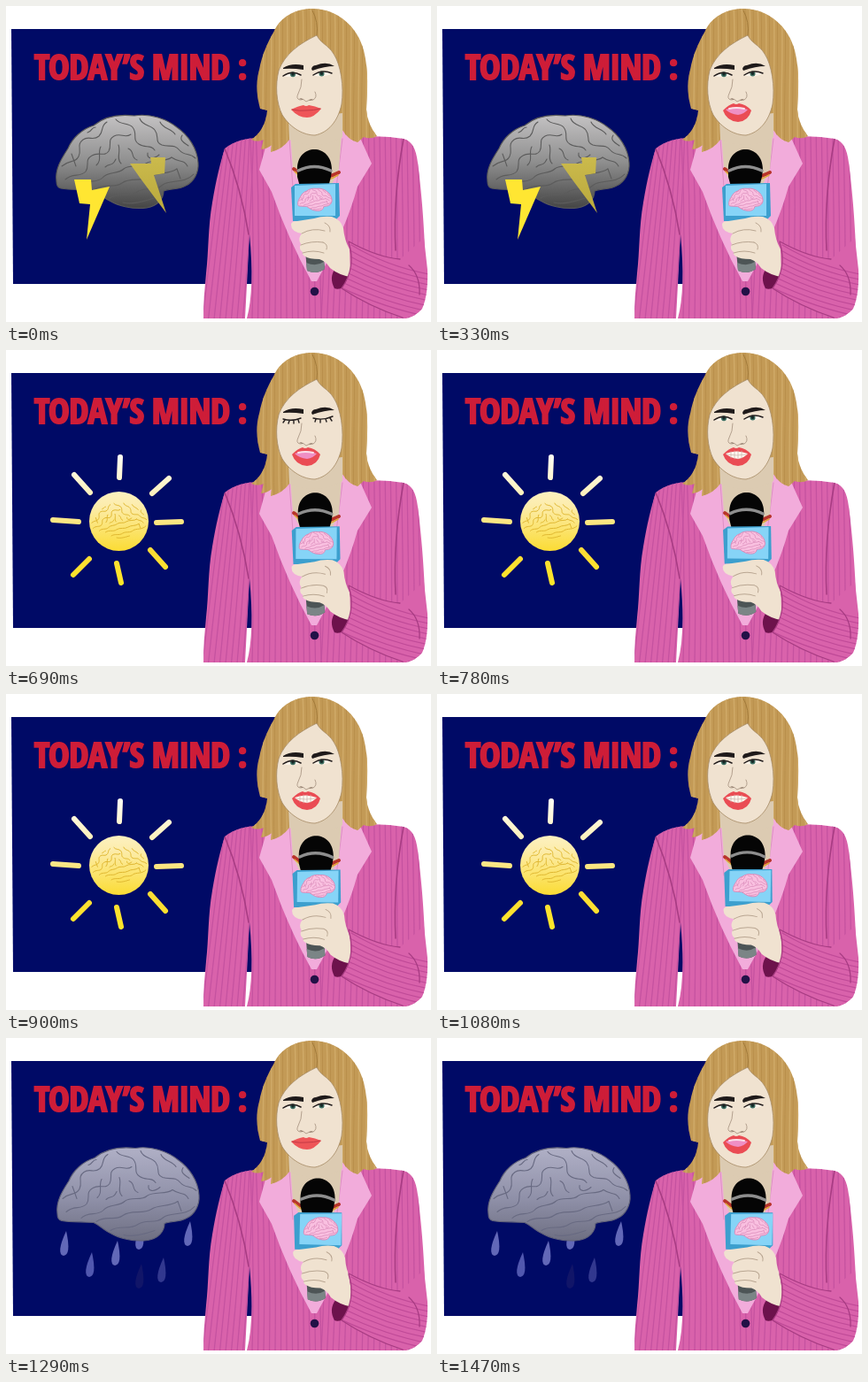
Animation of 480x357 px, one loop 1.8 s. Source, as an HTML page:

```html
<!DOCTYPE html>
<html lang="en">
<head>
<meta charset="utf-8">
<title>Today's Mind</title>
<style>
html, body { margin: 0; width: 100%; height: 100%; overflow: hidden; background: #fff; }
svg { display: block; width: 100vw; height: 100vh; }
.line { fill: none; stroke-linecap: round; stroke-linejoin: round; }
#title { font-weight: 700; font-stretch: condensed; letter-spacing: -.015em; }
</style>
</head>
<body>
<svg viewBox="0 0 480 357" preserveAspectRatio="none">
  <defs>
    <linearGradient id="storm" x1="0" y1="0" x2="0" y2="1">
      <stop offset="0" stop-color="#c4c2c3"/><stop offset=".5" stop-color="#8f8f8f"/><stop offset="1" stop-color="#454545"/>
    </linearGradient>
    <linearGradient id="rain" x1="0" y1="0" x2="0" y2="1">
      <stop offset="0" stop-color="#b0b0c6"/><stop offset=".55" stop-color="#8f90a8"/><stop offset="1" stop-color="#6e6f82"/>
    </linearGradient>
    <linearGradient id="sun" gradientUnits="userSpaceOnUse" x1="0" y1="120" x2="0" y2="262">
      <stop offset="0" stop-color="#fffdf2"/><stop offset=".4" stop-color="#fcecab"/><stop offset=".75" stop-color="#fbdc35"/><stop offset="1" stop-color="#ffe629"/>
    </linearGradient>
    <linearGradient id="bolt" x1="0" y1="0" x2="0" y2="1">
      <stop offset="0" stop-color="#cbba4c"/><stop offset="1" stop-color="#b9a83c"/>
    </linearGradient>
    <path id="brainShape" d="M57 198 C55 184 63 172 70 161 C75 149 86 139 99 135 C111 125 128 122 145 124 C163 121 182 128 193 137 C206 146 216 161 217 177 C218 188 212 199 203 203 C195 208 184 206 178 209 C178 218 171 226 159 228 C143 230 127 226 117 220 C110 217 105 211 98 208 C86 207 72 208 62 206 C58 205 57 202 57 198Z"/>
    <g id="folds" class="line">
      <path d="M63 181 C72 173 78 178 82 170 C86 162 79 157 87 151 C94 146 98 153 105 147 C111 141 106 136 114 131"/>
      <path d="M67 196 C75 188 84 194 90 187 C95 180 88 174 97 169 C105 164 111 171 116 164 C120 157 114 151 122 147 C130 143 134 150 141 145"/>
      <path d="M84 203 C91 195 103 201 109 194 C114 187 127 190 133 184 C140 178 152 184 158 178 C166 172 180 177 187 171"/>
      <path d="M101 207 C112 199 122 207 131 200 C140 193 154 199 163 193 C171 187 183 191 193 184"/>
      <path d="M117 217 C127 210 139 217 148 210 C157 204 169 210 177 202 C185 196 202 201 212 190"/>
      <path d="M124 128 C129 135 138 131 143 137 C149 144 142 151 150 156 C157 161 164 156 168 163"/>
      <path d="M151 127 C154 136 164 134 168 140 C174 148 167 153 176 157 C184 160 190 155 196 163 C202 170 207 165 214 172"/>
      <path d="M174 131 C177 139 187 138 191 145 M199 146 C195 152 202 155 206 158 M92 143 C98 141 96 137 101 137"/>
      <path d="M107 159 C103 166 109 174 102 180 M127 157 C130 165 124 172 130 178 M138 161 C146 164 140 171 148 174 M74 167 L79 181"/>
      <path d="M112 182 C117 177 120 182 124 173 M160 166 C159 173 166 174 173 168 M187 171 C195 177 201 173 205 181 M132 222 C143 225 157 220 167 217 M193 184 L197 195"/>
    </g>
    <pattern id="strands" width="9" height="170" patternUnits="userSpaceOnUse">
      <path class="line" d="M2 0 C5 45 0 110 3 170" stroke="#d0aa68" stroke-width="1.4"/>
      <path class="line" d="M6 0 C8 60 4 115 6 170" stroke="#b68c48" stroke-width=".8"/>
    </pattern>
    <path id="jacket" d="M286 149 C270 149 257 153 247 161 C242 177 237 198 233 222 C228 250 229 277 226 302 Q223 328 223 353 H270 L275 258 Q281 320 272 353 H452 Q467 350 472 335 Q478 310 473 285 C473 253 469 207 465 177 C463 161 459 153 449 150 Q425 146 401 148Z"/>
    <clipPath id="inJacket"><use href="#jacket"/></clipPath>
    <path id="sleeve" d="M387 266 Q420 284 445 286 L472 262 Q474 280 476 298 Q477 326 470 342 Q463 351 448 352 Q411 340 379 319 Q391 303 390 287Z"/>
    <clipPath id="inSleeve"><use href="#sleeve"/></clipPath>
    <path id="hair" d="M346 3 C326 3 310 13 303 28 C296 40 289 55 286 72 C281 90 284 104 287 116 L295 118 Q293 140 277 151 Q284 154 291 151 L288 162 Q296 161 300 157 L299 165 Q312 162 320 151 L380 140 Q386 151 397 154 L404 148 Q412 151 419 147 Q408 133 407 117 C408 96 410 74 404 50 C397 23 374 3 346 3Z"/>
    <path id="face" d="M351 33 C332 42 315 54 308 73 C304 89 305 109 312 123 C322 139 337 146 349 146 C364 143 375 130 379 111 C382 91 378 66 370 54 C364 44 355 42 351 33Z"/>
  </defs>

  <rect width="480" height="357" fill="#fff"/>
  <path d="M6 26 H307 V314 H8Z" fill="#000a66"/>
  <text id="title" x="32" fill="#ce1d38" stroke="#ce1d38" stroke-width="2">TODAY’S MIND :</text>

  <g id="stormScene">
    <use href="#brainShape" fill="url(#storm)" stroke="#5a5a5a" stroke-width="1.1"/>
    <use href="#folds" stroke="#5c5c5c" stroke-width="1.1"/>
    <path d="M77 196 L96 196 L97 208 L117 204 L91 264 L95 224 L83 223Z" fill="#ffe632"/>
    <path d="M140 178 L164 178 L163 171 L180 171 L179 189 L167 191 L181 234 L152 195Z" fill="url(#bolt)"/>
  </g>
  <g id="sunScene">
    <circle cx="127.5" cy="193.5" r="33.5" fill="url(#sun)"/>
    <g transform="translate(71 121) scale(.41)"><use href="#folds" stroke="#dfb62f" stroke-width="2.4"/></g>
    <path class="line" stroke="url(#sun)" stroke-width="6" d="M129 121 L128 144 M184 145 L165 162 M170 195 L198 194 M163 226 L180 245 M125 241 L130 263 M94 236 L76 254 M53 192 L82 194 M77 141 L95 161"/>
  </g>
  <g id="rainScene">
    <g id="drops"></g>
    <g transform="translate(1 .5)">
      <use href="#brainShape" fill="url(#rain)" stroke="#62637a" stroke-width="1.1"/>
      <use href="#folds" stroke="#686a82" stroke-width="1.1"/>
    </g>
  </g>

  <use href="#jacket" fill="#d962ab"/>
  <g clip-path="url(#inJacket)">
    <g id="stripes" class="line" stroke="#c552a0" stroke-width="1.3"></g>
    <path class="line" d="M247 161 Q266 207 274 258 M449 150 Q437 215 440 276" stroke="#a83c83" stroke-width="1.6"/>
  </g>
  <path d="M320 145 L293 160 L286 185 L300 210 Q319 264 345 311 H351 Q384 252 397 204 L413 178 L400 149 L380 140Z" fill="#f2acdb"/>
  <path class="line" d="M320 150 L324 205 M380 150 L373 205" stroke="#dd8fc3" stroke-width="1"/>
  <path d="M320 130 H380 L376 185 Q365 211 350 224 Q332 206 324 183Z" fill="#dccbb2"/>
  <path class="line" d="M325 184 Q346 203 376 188" stroke="#b8342b" stroke-width="4"/>
  <path class="line" d="M326 187 Q347 208 375 191" stroke="#e0a53b" stroke-width="1.6"/>
  <circle cx="348.5" cy="322.5" r="4.8" fill="#231147"/>

  <use href="#hair" fill="#c39a56"/>
  <use href="#hair" fill="url(#strands)"/>
  <path d="M319 128 L380 121 V148 Q366 157 350 157 Q330 157 320 151Z" fill="#dccbb2"/>
  <use href="#face" fill="#f0e2d0" stroke="#a58a64" stroke-width=".8"/>
  <path class="line" d="M351 33 Q353 18 346 5" stroke="#a27a3a" stroke-width="1"/>

  <path d="M313 70 Q322 64 336 67 L336 72 Q323 70 313 71Z M345 71 Q346 67 350 67 Q362 62 371 68 Q360 68 346 73Z" fill="#1f1a1a"/>
  <g id="eyesOpen">
    <path d="M313 79 Q323 72 333 78 Q324 82 313 79Z M347 78 Q357 71 368 76 Q358 82 347 78Z" fill="#fbf3e8"/>
    <circle cx="324" cy="77.3" r="3" fill="#3d6f62"/><circle cx="356.5" cy="76.5" r="3" fill="#3d6f62"/>
    <circle cx="324" cy="77.1" r="1.6" fill="#152625"/><circle cx="356.5" cy="76.3" r="1.6" fill="#152625"/>
    <path class="line" d="M313 79 Q323 72 333 78 M347 78 Q357 71 368 76" stroke="#231d1d" stroke-width="1.5"/>
  </g>
  <g id="eyesShut" class="line" stroke="#231d1d" stroke-width="1.4">
    <path d="M313 78 Q323 81 333 77 M347 77 Q358 80 369 75 M315 79 L313 82 M320 80 L319 83 M325 80 L325 83 M330 79 L331 82 M350 78 L349 81 M355 79 L355 82 M361 78 L362 81 M366 77 L368 80"/>
  </g>
  <path class="line" d="M334 83 Q334 92 330 99 Q327 105 332 106 Q336 104 339 108 Q343 105 347 106 Q352 103 349 97" stroke="#b3a08e" stroke-width="1"/>
  <path d="M331 105 Q334 103 336 106Z M342 107 Q344 104 347 106Z" fill="#8b7767"/>

  <g id="closed">
    <path d="M322 117 Q330 113 336 112 Q339 114 342 112 Q349 113 356 116 Q348 126 340 126 Q330 126 322 117Z" fill="#ee5558"/>
    <path class="line" d="M323 117 Q332 119 339 118 Q348 118 355 116" stroke="#c43a45" stroke-width="1"/>
  </g>
  <g id="open">
    <path d="M323 118 Q330 111 335 110 Q338 112 341 110 Q349 111 355 118 Q352 130 340 131 Q327 130 323 118Z" fill="#ea4c54"/>
    <path id="inner" d="M326 117 Q338 112 351 117 Q347 122 340 123 Q331 122 326 117Z"/>
    <path id="teeth" class="line" d="M327 118 Q339 120 350 118 M332 115 V122 M336 114 V123 M340 114 V123 M344 114 V122" stroke="#c8b4ac" stroke-width=".7"/>
    <path id="tongue" class="line" d="M330 116 Q338 114 347 116" stroke="#fbe0ea" stroke-width="2"/>
  </g>

  <path d="M373 295 Q364 306 371 319 Q378 322 389 312 L388 295Z" fill="#6d124c"/>
  <g id="mic">
    <path d="M337 265 H357 L360 297 Q351 304 340 299Z" fill="#4d5556"/>
    <path d="M339 290 Q350 295 359 289 L360 297 Q350 304 340 299Z" fill="#7b8586"/>
    <path d="M329 185 C328 155 368 154 368 185 L367 193 L363 208 H333 L329 193Z" fill="#050505"/>
    <path class="line" d="M330 186 Q348 177 367 186" stroke="#8e8e8e" stroke-width="3.4"/>
    <path d="M322 205 L327 201 L376 200 L377 237 L371 243 L324 243Z" fill="#3c9fce"/>
    <path id="cubeFront" fill="#86d4f7"/>
    <g id="emblem">
      <use href="#brainShape" fill="#f9c0e0" stroke="#d988b8" stroke-width="4"/>
      <use href="#folds" stroke="#d988b8" stroke-width="3"/>
    </g>
    <path d="M322 247 Q322 243 329 243 L348 240 Q357 237 368 238 Q378 241 381 251 Q382 264 388 275 L389 306 Q376 304 366 296 Q361 288 354 286 Q342 286 338 283 Q334 281 335 278 Q330 275 333 269 Q329 263 334 257 Q322 255 322 247Z" fill="#f0e2d0"/>
    <path class="line" d="M334 257 Q346 250 360 254 M333 270 Q345 265 358 267 M335 279 Q347 275 359 279 M360 245 Q367 248 366 255 M358 267 Q364 269 362 275" stroke="#b9a692" stroke-width="1"/>
  </g>
  <use href="#sleeve" fill="#d962ab"/>
  <g id="cuffStripes" class="line" clip-path="url(#inSleeve)" stroke="#c04a98" stroke-width="1.3"></g>
  <path class="line" d="M387 266 Q420 284 445 286 M387 267 Q396 295 379 319 Q411 340 448 352 M455 293 Q468 304 467 326" stroke="#a83c83" stroke-width="1.3"/>
</svg>
<script>
const LOOP = 1800;
const $ = id => document.getElementById(id);
const show = (id, on) => $(id).setAttribute('display', on ? 'inline' : 'none');
const mix = (a, b, k) => a + (b - a) * k;
const path = d => `<path d="${d}"/>`;

// Use the narrowest installed face, as large as the panel allows.
function setTitle() {
  const title = $('title'), size = 48, room = 240;
  const widthIn = face => {
    title.style.fontFamily = `"${face}", sans-serif`;
    title.style.fontSize = size + 'px';
    return title.getComputedTextLength();
  };
  const faces = ['Open Sans Condensed', 'Roboto Condensed', 'Open Sans', 'Roboto', 'Noto Sans', 'Noto Sans CJK JP', 'Lato'];
  const [width, face] = faces.map(f => [widthIn(f), f]).sort((a, b) => a[0] - b[0])[0];
  const fit = Math.min(size, size * room / width);
  title.style.fontFamily = `"${face}", sans-serif`;
  title.style.fontSize = fit + 'px';
  title.setAttribute('y', 68.5 + fit * .357);
}
setTitle();

const repeat = (n, fn) => Array.from({ length: n }, (_, i) => fn(i)).join('');
$('stripes').innerHTML =
  repeat(8, i => path(`M${248 + i * 4.5} 148 Q${235 + i * 6} 240 ${222 + i * 6.5} 354`)) +
  repeat(13, i => path(`M${276 + i * 6.5} 148 Q${281 + i * 6} 250 ${278 + i * 6.5} 354`)) +
  repeat(19, i => path(`M${360 + i * 6.2} 148 Q${362 + i * 6.2} 250 ${356 + i * 6.6} 354`));
$('cuffStripes').innerHTML =
  repeat(9, i => path(`M${390 - i * 1.5} ${270 + i * 6} Q430 ${294 + i * 6} 478 ${303 + i * 6}`));

const drops = [[66, 232, '#6268b8'], [95, 256, '#5158af'], [124, 243, '#6268b8'], [151, 225, '#6268b8'],
  [151, 269, '#111568'], [176, 262, '#32388f'], [206, 221, '#6268b8']];
$('drops').innerHTML = drops.map(([x, y, c]) =>
  `<path fill="${c}" d="M${x + 2} ${y - 14} Q${x + 8} ${y + 13} ${x - 1} ${y + 14} Q${x - 10} ${y + 12} ${x + 2} ${y - 14}Z"/>`).join('');

function mouth(t) {
  if (t < 330) return 'closed';
  if (t < 780) return 'tongue';
  if (t < 1200) return 'teeth';
  return t < 1410 ? 'closed' : 'tongue';
}

function draw(t) {
  show('stormScene', t < 600);
  show('sunScene', t >= 600 && t < 1200);
  show('rainScene', t >= 1200);

  const shut = t >= 630 && t < 780;
  show('eyesOpen', !shut);
  show('eyesShut', shut);

  const m = mouth(t);
  show('closed', m === 'closed');
  show('open', m !== 'closed');
  show('teeth', m === 'teeth');
  show('tongue', m === 'tongue');
  $('inner').setAttribute('fill', m === 'teeth' ? '#fff8ef' : '#ef8fc4');

  const k = Math.min(1, Math.max(0, (t - 510) / 780));
  $('mic').setAttribute('transform', `translate(${mix(0, 1.4, k)} ${mix(0, -3.5, k)}) rotate(${mix(0, 1.4, k)} 350 275)`);
  const left = mix(326, 329, k), right = mix(372, 376, k);
  $('cubeFront').setAttribute('d', `M${left} 203 L${right} 201 V237 H${left}Z`);
  $('emblem').setAttribute('transform', `translate(${mix(316, 320, k)} 176.5) scale(.24)`);
}

function tick() {
  draw(performance.now() % LOOP);
  requestAnimationFrame(tick);
}
tick();
</script>
</body>
</html>
```
